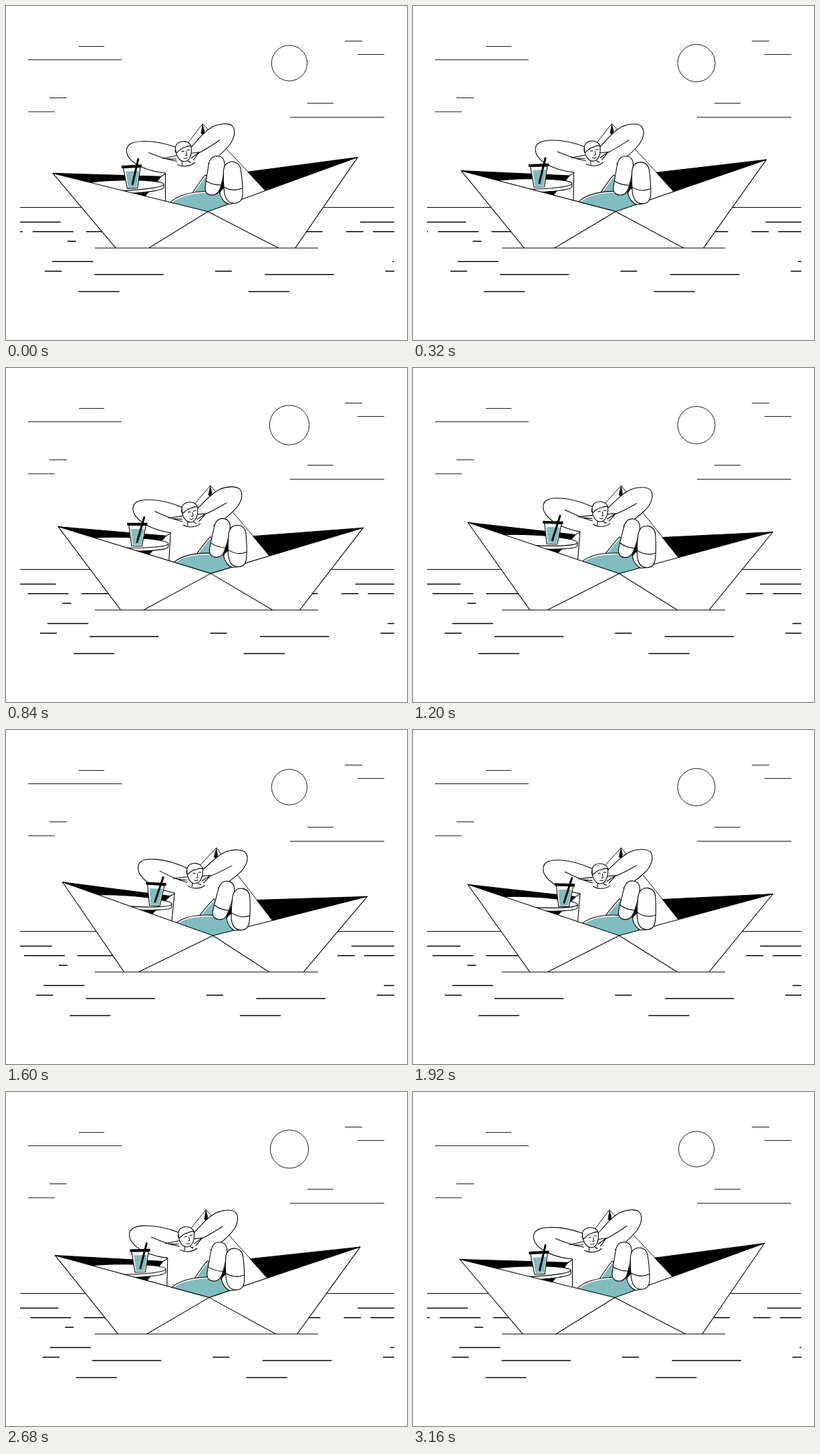
Recreate the animation shown at these times as an HTML page with a canvas. Size 600x500 px, loop 3.2 s.

```html
<!DOCTYPE html>
<html lang="en">
<head>
<meta charset="utf-8">
<title>Paper boat</title>
<style>
html, body { margin: 0; width: 100%; height: 100%; overflow: hidden; background: #fff; }
canvas { display: block; width: 600px; height: 500px; }
</style>
</head>
<body>
<canvas id="stage" width="600" height="500"></canvas>
<script>
const g = document.getElementById('stage').getContext('2d');
const LOOP = 3200, STEP = 40, HALF = LOOP / 2;
const TEAL = '#80bdbf', INK = '#000', PAPER = '#fff';
const PIVOT = [305.4, 385], SWING = 0.1;

// y, then start and end of each stroke
const clouds = [
  [60.5, 109, 147], [80.5, 33, 173], [137.5, 65, 91], [158.3, 33, 73],
  [52.5, 507, 533], [72.5, 526, 566], [145.5, 451, 490], [166.5, 425, 566]
];
const waves = [
  [323.5, 0, 82, 530, 620],
  [337.7, 0, 25, 40, 101, 120, 181, 430, 474, 509, 535, 549, 620],
  [352.3, 92, 105],
  [382.5, 69.3, 130.6, 578.5, 620],
  [396.9, 58.3, 83.5, 313, 338, 567.8, 620],
  [401.9, 132.6, 236, 387.5, 491],
  [427.4, 108.5, 169.5, 363, 424.3]
];
// sliding of the cup along the tray: time, offset
const slide = [
  [360, -2.3], [880, 0], [1640, 21.4], [1980, 26.5],
  [2240, 26], [2720, 8.7], [3200, 0.3], [3560, -2.3]
];

// symmetric cubic-bezier(p, 0, 1 - p, 1)
function ease(x, p = 0.22) {
  let lo = 0, hi = 1, s = 0.5;
  for (let i = 0; i < 24; i++) {
    s = (lo + hi) / 2;
    const v = 3 * s * (1 - s) * ((1 - s) * p + s * (1 - p)) + s * s * s;
    if (v < x) lo = s; else hi = s;
  }
  return s * s * (3 - 2 * s);
}

// 0 to 1 and back over the given period
function pingPong(t, period) {
  const u = (t % period) / period;
  return u < 0.5 ? u * 2 : 2 - u * 2;
}

function grade(keys, i) {
  return (keys[i + 1][1] - keys[i][1]) / (keys[i + 1][0] - keys[i][0]);
}

function tangent(keys, i) {
  if (i === 0 || i === keys.length - 1) return 0;
  const a = grade(keys, i - 1), b = grade(keys, i);
  return a * b > 0 ? 2 * a * b / (a + b) : 0;
}

// smooth curve through the keys without overshoot
function cupOffset(t) {
  if (t < slide[0][0]) t += LOOP;
  let i = 0;
  while (i < slide.length - 2 && t > slide[i + 1][0]) i++;
  const [t0, a] = slide[i], [t1, b] = slide[i + 1];
  const h = t1 - t0, u = (t - t0) / h, w = 1 - u;
  return a * w * w * (1 + 2 * u) + b * u * u * (3 - 2 * u)
    + h * u * w * (w * tangent(slide, i) - u * tangent(slide, i + 1));
}

function shape(d, fill, width = 1.1) {
  const p = new Path2D(d);
  if (fill) { g.fillStyle = fill; g.fill(p); }
  if (width) { g.lineWidth = width; g.stroke(p); }
}

const line = (d, width) => shape(d, null, width);

function strokes(rows, width, dx = 0) {
  g.lineWidth = width;
  g.beginPath();
  for (const [y, ...xs] of rows) {
    for (let i = 0; i < xs.length; i += 2) {
      g.moveTo(xs[i] + dx, y);
      g.lineTo(xs[i + 1] + dx, y);
    }
  }
  g.stroke();
}

function drawSky(t) {
  strokes(clouds, 0.9);
  g.lineWidth = 0.9;
  g.beginPath();
  g.arc(424, 85.5, 26.6 + 3.2 * ease(pingPong(t, HALF)), 0, 7);
  g.stroke();
}

function drawWater(t) {
  const u = pingPong(t, LOOP);
  g.save();
  g.beginPath();
  g.rect(21, 290, 560, 150);
  g.clip();
  strokes([[301.5, 0, 600]], 1.1);
  strokes(waves, 1.5, -13.3 * (u + ease(u)) / 2);
  g.restore();
}

function drawInside() {
  shape('M294 176.3L388 275.5L302 308L238 291L238 250Z', PAPER, 0);
  line('M238 250L294 176.3L388 275.5', 0.9);
  shape('M294 176.8L291.8 190.5L296 193.5L296.8 187Z', INK, 0.5);
  shape('M362 248.3L526 226.5L388 276Z', INK);
  shape('M70 250.5L232 255.3L207 286Z', INK);
  line('M232 255.3L238 251.2');
}

function drawTray() {
  g.save();
  g.translate(169, 268.8);
  g.rotate(-0.03);
  shape('M-67 0V4.8A67 7.8 0 0 0 67 4.8V0Z', PAPER);
  shape('M-67 0A67 7.8 0 0 0 67 0A67 7.8 0 0 0 -67 0Z', PAPER);
  g.restore();
}

function drawCup(t) {
  const d = cupOffset(t);
  g.save();
  g.translate(d, -0.05 * d - 0.8);
  shape('M175.5 243L181.5 274L197 273.2L201 242Z', PAPER);
  shape('M179 248.7L199 247.5L195.8 271.8L183 272.5Z', TEAL, 0);
  line('M173 241.8L203.2 240.2', 4);
  g.lineCap = 'round';
  line('M197.8 230.3L189.3 267.5', 3);
  g.restore();
}

function drawBody() {
  const arms = 'M238.5 292V250C215 248 190 239 182 224C176 209 186 202.8 206 202.6C222 202.3 239 206 254 211.5'
    + 'M277 211.5C288 199 297 187.5 308.5 181C319 175.8 333 174.5 338.5 179.5C345 187 341 199.5 334 208.5'
    + 'C326 218 314 229 302 236.5';
  // one closed silhouette behind the outlines
  shape(arms.replace('M277', 'L277') + 'L320 290Z', PAPER, 0);
  line(arms);
  line('M213 219.5Q227 225 240 229L256 232.5M234 228.5L255 224M240 229H255');
  line('M320 200.5C308 208.5 298 215.5 287 220.5L277 228M277 220.5L291 218.5M288 220.5L280 231');
  line('M256.5 237.3C263 241 275 241.3 282.5 234M263.5 231V238.5M272 231.5Q273 234 277 234');
}

function drawHead() {
  shape('M253.5 214C254 221 256.5 227 260.5 230.5C264.5 234 271 233.5 274.3 228.5C277 224 278 218 277 211'
    + 'C276 205 270 202.5 265 202.7C258 203 253 207 253.5 214Z', PAPER);
  line('M253.5 214C252.5 218 254 220.5 256 219.5C258.5 217 261 213.5 265 212.5C269 211.5 271.5 208.5 277 209.5');
  line('M262.8 218.5Q264.5 216.7 266.8 217.8M270.5 216.2Q272.5 214.7 275 215.5'
    + 'M269.3 217.5L270.8 223.3L268 224M265.5 227.6Q269 229.3 271.5 226.8', 1);
}

function drawLegs() {
  shape('M277 283C283 274 291 261 298 253L326 272L328 296Z', PAPER);
  shape('M280.5 281C286 273 293 262 299 255L324 276L322 290Z', TEAL, 0);
  shape('M246 294C256 284 272 279 296 277.5C306 277 314 276 322 274.5L330 296L302 310Z', PAPER);
  shape('M248 295C258 286 273 281.3 296 279.7C306 279 314 277.5 321 276.5L330 297L302 310Z', TEAL, 0);
}

function drawFeet() {
  shape('M319 280L326 258L329 274Z', INK);
  shape('M316 224.5C308 224.5 304 231 303 239C301 251 299 262 298 272C297.8 279.5 302 283 308.5 283'
    + 'C315.5 283 319 278.5 321 271C324 261 326 251 327 240C327.5 231 324 225 316 224.5Z', PAPER);
  line('M299.5 262Q309 268 321 268');
  shape('M327 271.5C322.5 274.5 319.5 277 320 281C321.5 288 327 295 333.5 296.8L342 295.5Z', PAPER);
  shape('M339 233.3C331 233 326 238 325.3 248C325 258 325.5 269 326.5 278C328 288.5 333 295.3 341.5 295.3'
    + 'C349.5 295.3 353.7 290 354 281.5C354.2 270 353 257 351.3 246C350.3 238 346 233.6 339 233.3Z', PAPER);
  line('M326.3 271Q340 279 354 272.5');
}

function drawHull() {
  shape('M70 250.5L302 307.7L526 226.5L404.7 403.2L198.7 403.2Z', PAPER);
  line('M188.5 378L302 307.7L445.7 381.9');
}

function drawBoat(t) {
  g.save();
  g.beginPath();
  g.rect(0, 0, 600, 362);
  g.clip();
  g.translate(...PIVOT);
  g.rotate(SWING * ease(pingPong(t, LOOP)));
  g.translate(-PIVOT[0], -PIVOT[1]);
  drawInside();
  drawTray();
  drawBody();
  drawHead();
  drawLegs();
  drawHull();
  drawCup(t);
  drawFeet();
  g.restore();
  strokes([[362.2, 133, 467]], 1.1);
}

function frame() {
  const t = (Math.floor(performance.now() / STEP) + 1) * STEP % LOOP;
  g.fillStyle = PAPER;
  g.fillRect(0, 0, 600, 500);
  g.strokeStyle = INK;
  g.lineJoin = 'round';
  drawSky(t);
  drawWater(t);
  drawBoat(t);
  requestAnimationFrame(frame);
}
frame();
</script>
</body>
</html>
```
